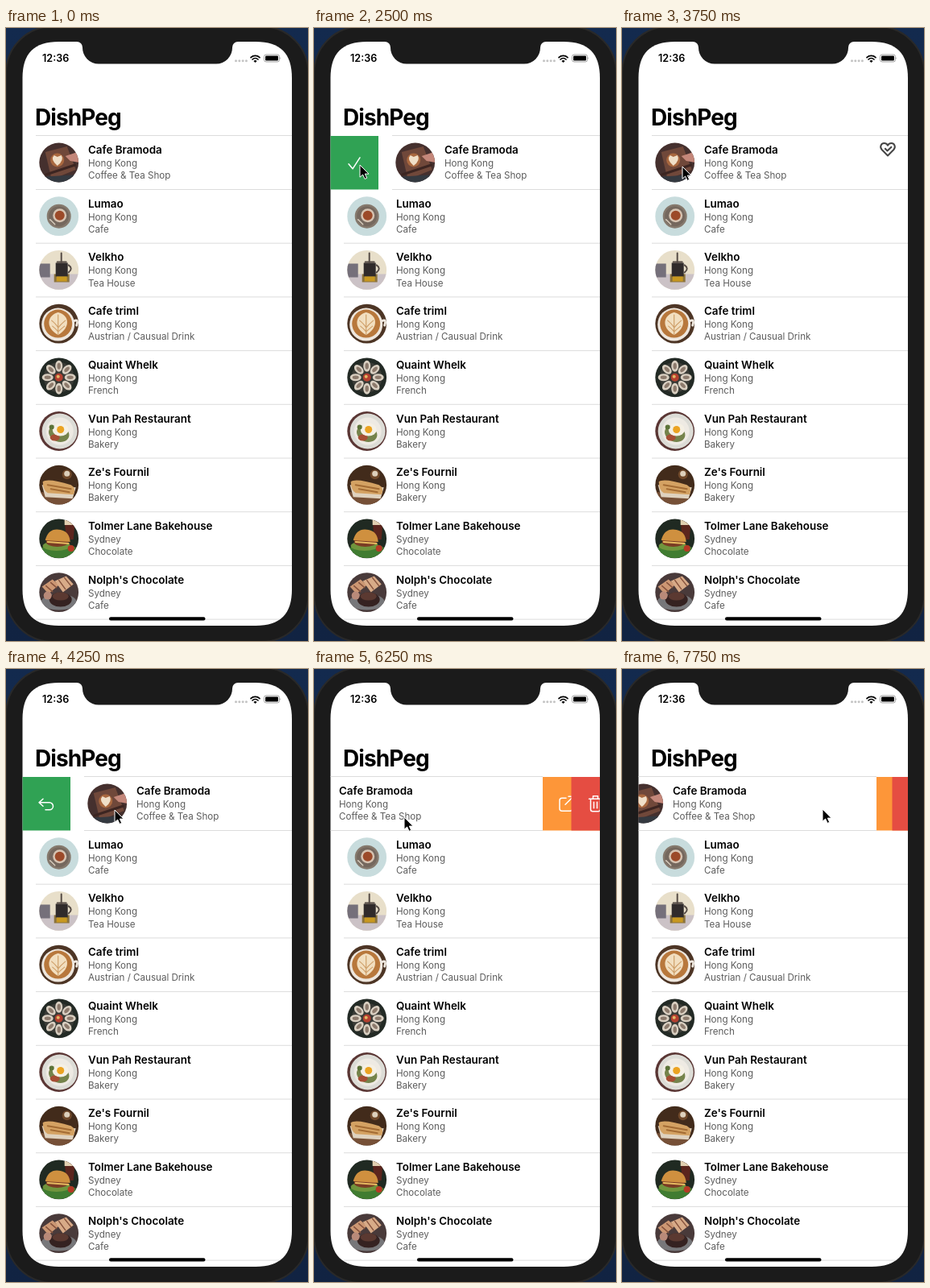
An HTML page that plays this animation: 375 px wide and 761 px high, repeating every 8000 ms.

```html
<!DOCTYPE html>
<html lang="en">
<head>
<meta charset="utf-8">
<title>Restaurant list with swipe actions</title>
<style>
  html, body { margin: 0; width: 100%; height: 100%; overflow: hidden; background: #1b1b1b; }
  svg { display: block; width: 100%; height: 100%; }
  text { font-family: Inter, Roboto, sans-serif; font-optical-sizing: none; }
  .title { font-size: 28px; font-weight: 700; letter-spacing: -.9px; }
  .clock { font-size: 12.6px; font-weight: 600; }
  .name { font-size: 13.4px; font-weight: 600; }
  .info { font-size: 11.6px; fill: #5c5c5c; }
  .icon { fill: none; stroke: #fff; stroke-width: 1.5; stroke-linecap: round; stroke-linejoin: round; }
  .sep { stroke: #dcdcdc; }
</style>
</head>
<body>
<svg id="stage" viewBox="0 0 375 761"></svg>
<script>
const STEP = 250, LOOP = 8000, TOP = 134, PITCH = 66.7;
const $ = id => document.getElementById(id);

const disc = (x, y, r, fill) => `<circle cx="${x}" cy="${y}" r="${r}" fill="${fill}"/>`;
const oval = (x, y, rx, ry, fill, turn = 0) =>
  `<ellipse rx="${rx}" ry="${ry}" fill="${fill}" transform="translate(${x} ${y}) rotate(${turn})"/>`;
const shape = (d, fill) => `<path d="${d}" fill="${fill}"/>`;
const line = (d, color, w) =>
  `<path d="${d}" fill="none" stroke="${color}" stroke-width="${w}" stroke-linecap="round"/>`;
const around = (n, make) =>
  Array.from({ length: n }, (_, i) => make(i * 2 * Math.PI / n, i * 360 / n)).join('');

// Dish pictures, drawn around 0,0 inside a circle of radius 24.4
const dishes = [
  shape('M-25-25H25V25H-25Z', '#45302e') + shape('M-17-13L10-20 21 9-9 21Z', '#70483a') +
    line('M-16 15L20 3', '#3c2521', 3) + shape('M8-8L26-14V0L14-2Z', '#c4877a') +
    disc(-2, -3, 8.5, '#a9683f') + shape('M-2 4Q-11-4-6-9L-2-7 3-9Q7-3-2 4Z', '#f0dfc8') +
    shape('M-25 18L25 15V25H-25Z', '#343940'),
  shape('M-25-25H25V25H-25Z', '#c8dcdd') + disc(0, 0, 15, '#85796d') + disc(0, 0, 12.5, '#75685e') +
    disc(1, -1, 8.5, '#d6c3b1') + disc(1, -1, 6, '#9c4a29') + line('M-11 4L-5 10', '#d8cdbd', 1.5),
  shape('M-25-25H25V25H-25Z', '#e8dfca') + shape('M-25 5H25V25H-25Z', '#cbc2c6') +
    shape('M-25-8H-11V9H-25Z', '#75707a') + shape('M-6 5H13V15H-6Z', '#8b733c') +
    shape('M-4-9H11V8H-4Z', '#302b2b') + shape('M-3 8H10V14H-3Z', '#c89820') +
    line('M3-21V-9M-2-10H9M12-6q6 4 0 9', '#554b45', 2),
  shape('M-25-25H25V25H-25Z', '#4d3525') + disc(-1, 1, 20.5, '#eee7de') + disc(-1, 0, 17.5, '#b8783c') +
    shape('M-1 14C-18 5-14-11-1-14C13-11 15 5-1 14Z', '#f2dfc0') +
    line('M-1 13V-11M-9-4Q-3 1-1 5Q2 1 8-4M-8 3Q-3 7-1 10Q2 7 7 3', '#cfa06a', 1.2) +
    line('M18-3q7-4 4 5', '#eee7de', 3),
  shape('M-25-25H25V25H-25Z', '#232a25') + disc(0, 0, 19, '#3a3b36') +
    around(8, (a, deg) => {
      const x = 14 * Math.cos(a), y = 14 * Math.sin(a);
      return oval(x, y, 7, 4.5, '#d8cec0', deg) + oval(x, y, 4, 2.2, '#8c7a6c', deg);
    }) + disc(0, 0, 5, '#b4402f') + disc(-1, -1, 2, '#e2b765'),
  shape('M-25-25H25V25H-25Z', '#5a3634') + disc(1, 0, 22, '#dcdcd6') + disc(1, 0, 17, '#eeeae3') +
    oval(0, 3, 13, 10, '#75834b', 20) + oval(-5, 8, 6, 4, '#a64e34') + oval(2, -2, 10, 8, '#f5f0e4') +
    disc(2, -2, 4.5, '#eba321') + disc(-9, -5, 3, '#5c7338'),
  shape('M-25-25H25V25H-25Z', '#422b1b') + disc(10, -13, 6, '#70492a') + disc(10, -14, 3.5, '#ddd0bb') +
    shape('M-25 8L17 17 25 10V25H-25Z', '#765037') + shape('M-21 0L21 3 17 17-17 15Z', '#dfd2bf') +
    shape('M-20-4Q-14-9 15 0Q22 4 18 12L-14 10Q-20 6-20-4Z', '#d4a263') +
    line('M-14 0L15 5M-10 5L13 9', '#a46c34', 2),
  shape('M-25-25H25V25H-25Z', '#202a22') + shape('M7-23H20L18 1H9Z', '#5b251d') +
    shape('M7-23H20V-17H7Z', '#e1cfb0') + oval(0, 15, 23, 9, '#407c31') + oval(-3, 9, 17, 6, '#70953d') +
    oval(-2, 4, 14, 6, '#7a3c24') + shape('M-17 2Q-13-14 2-11Q13-9 14 4Z', '#cf903f') +
    line('M-14 4L12 6', '#e7bb60', 2) + disc(15, 12, 4, '#b53925'),
  shape('M-25-25H25V25H-25Z', '#493a3a') + oval(0, 12, 22, 10, '#77777a') +
    shape('M-21-7L-8-16 0-9-13 2Z', '#cc9773') + shape('M-5-14L9-20 18-10 5 0Z', '#d8ab88') +
    line('M-16-8L-8-1M-10-12L-3-6M0-15L8-4M7-18L15-8', '#87533d', 1.5) +
    oval(2, 9, 14, 9, '#352221') + oval(2, 5, 10, 5, '#5b3931') + disc(-14, 4, 5, '#b98a79')
];

const places = [
  ['Cafe Bramoda', 'Hong Kong', 'Coffee & Tea Shop'],
  ['Lumao', 'Hong Kong', 'Cafe'],
  ['Velkho', 'Hong Kong', 'Tea House'],
  ['Cafe triml', 'Hong Kong', 'Austrian / Causual Drink'],
  ['Quaint Whelk', 'Hong Kong', 'French'],
  ['Vun Pah Restaurant', 'Hong Kong', 'Bakery'],
  ["Ze's Fournil", 'Hong Kong', 'Bakery'],
  ['Tolmer Lane Bakehouse', 'Sydney', 'Chocolate'],
  ["Nolph's Chocolate", 'Sydney', 'Cafe']
];

const row = ([name, city, kind], i) => `
  <g transform="translate(0 ${TOP + i * PITCH})">
    <g transform="translate(65.7 33)" clip-path="url(#round)">${dishes[i]}</g>
    <text class="name" x="102" y="22">${name}</text>
    <text class="info" x="102" y="38">${city}</text>
    <text class="info" x="102" y="53.3">${kind.replace('&', '&amp;')}</text>
    <path class="sep" d="M37 ${PITCH - .2}H355"/>
  </g>`;

const button = (id, color, width, icons) => `
  <g id="${id}"><rect width="${width}" height="66.5" fill="${color}"/>
    <g class="icon" transform="translate(30 33.3)">${icons}</g></g>`;

// Rounded screen whose corners ease into the straight sides
const screen = `M20.5 62C20.5 31.5 35 17 65.5 17H310C340.5 17 355 31.5 355 62
  V697C355 727.5 340.5 742 310 742H65.5C35 742 20.5 727.5 20.5 697Z`;

$('stage').innerHTML = `
  <defs>
    <linearGradient id="desk" x2="0" y2="1">
      <stop stop-color="#132a4e"/><stop offset="1" stop-color="#112342"/>
    </linearGradient>
    <clipPath id="round"><circle r="24.4"/></clipPath>
    <clipPath id="screen"><path d="${screen}"/></clipPath>
  </defs>
  <rect width="375" height="761" fill="url(#desk)"/>
  <rect x="0" y="-2" width="375.5" height="764" rx="58" fill="#1b1b1b" stroke="#292929" stroke-width="2"/>
  <g clip-path="url(#screen)">
    <rect x="20" y="17" width="336" height="726" fill="#fff"/>
    <text class="title" x="36" y="121">DishPeg</text>
    <text class="clock" x="45" y="42">12:36</text>
    ${[285.5, 289.8, 294.1, 298.4].map(x => disc(x, 40.8, 1.5, '#c4c4c4')).join('')}
    ${line('M304 36.6a8 8 0 0 1 11 0M306 39a5 5 0 0 1 7 0', '#000', 1.7)}
    ${shape('M307.4 41a3 3 0 0 1 4.2 0L309.5 43Z', '#000')}
    <rect x="320.5" y="33" width="19" height="9" rx="2.5" fill="none" stroke="#999" stroke-width=".9"/>
    <rect x="322" y="34.5" width="16" height="6" rx="1.2"/>
    ${shape('M340.5 36q1.5 1.5 0 3Z', '#999')}
    ${places.slice(1).map((p, i) => row(p, i + 1)).join('')}
    <g id="cell">
      <path class="sep" d="M37 ${TOP - .5}H355"/>
      ${row(places[0], 0)}
      <g id="heart" fill="none" stroke="#444" stroke-width="2" stroke-linejoin="round">
        <path d="M330 158.5L322.6 151C319.5 147.5 322 143 325.5 143C328 143 329.3 144.5 330 145.8
          C330.7 144.5 332 143 334.5 143C338 143 340.5 147.5 337.4 151Z"/>
        <path d="M326.3 149.3L329.5 152.5 335 147.2"/>
      </g>
    </g>
    ${button('done', '#30a254', 60,
      '<path id="check" d="M-7 1.5l5 6L7-6.5"/><path id="undo" d="M-4-6l-5 4.5 5 4.5M-9-1.5H4a4.5 4.5 0 0 1 0 9H-1"/>')}
    ${button('share', '#fd9639', 120,
      '<path d="M-1-7H-6a3 3 0 0 0-3 3V6a3 3 0 0 0 3 3H4a3 3 0 0 0 3-3V2M-2 1L8-9M2-9h6v6"/>')}
    ${button('trash', '#e54d42', 120,
      '<path d="M-8-6H8M-3-6V-9.5H3V-6M-6-6V7a2.5 2.5 0 0 0 2.5 2.5h7A2.5 2.5 0 0 0 6 7V-6M-2-2V5.5M2-2V5.5"/>')}
    <rect x="128" y="731.3" width="119.5" height="4.2" rx="2.1"/>
  </g>
  ${shape('M88 16V17a7 7 0 0 1 7 7a20 20 0 0 0 20 20.5H261a20 20 0 0 0 20-20.5a7 7 0 0 1 7-7V16Z', '#1b1b1b')}
  <path id="cursor" d="M0 0V15.2L3.6 12 6.1 17.4 8.7 16.2 6.3 11.1H11Z"
    stroke="#fff" stroke-width="1" stroke-linejoin="round"/>`;

// [step, cursor x, cursor y, cell offset]
const keys = [
  [3, 128, 180, 0], [5, 146, 174, 0], [7, 200, 177, 44], [8, 216, 178, 60],
  [10, 57, 170, 60], [11, 57, 170, 60], [12, 57, 171, 13], [13, 60, 171, 0],
  [15, 75, 172, 0], [17, 135, 175, 60], [19, 51, 178, 60], [20, 51, 178, 24],
  [21, 140, 177, 0], [22, 258, 176, 0], [23, 183, 181, 0], [25, 112, 184, -71],
  [27, 64, 186, -120], [29, 168, 178, -120], [31, 249, 174, -39]
];

function pose(step) {
  const i = keys.findIndex(k => k[0] >= step);
  if (i < 1) return keys[0].slice(1);
  const a = keys[i - 1], b = keys[i], f = (step - a[0]) / (b[0] - a[0]);
  return [1, 2, 3].map(n => a[n] + (b[n] - a[n]) * f);
}

const move = (id, x, y) => $(id).setAttribute('transform', `translate(${x} ${y})`);
const show = (id, on) => $(id).setAttribute('visibility', on ? 'visible' : 'hidden');

function draw(now) {
  const step = Math.floor(now % LOOP / STEP);
  const [x, y, offset] = pose(step);
  const left = Math.min(offset, 0);
  move('cursor', x, y);
  move('cell', offset, 0);
  move('done', offset - 40, TOP);
  move('share', 355 + left, TOP);
  move('trash', 355 + left / 2, TOP);
  show('cursor', step >= 3);
  show('done', offset > 0);
  show('share', offset < 0);
  show('trash', offset < 0);
  show('heart', step >= 12 && step <= 17);
  $('check').style.display = step < 13 ? '' : 'none';
  $('undo').style.display = step < 13 ? 'none' : '';
}

const start = performance.now();
function tick() {
  draw(performance.now() - start);
  requestAnimationFrame(tick);
}
tick();
</script>
</body>
</html>
```
